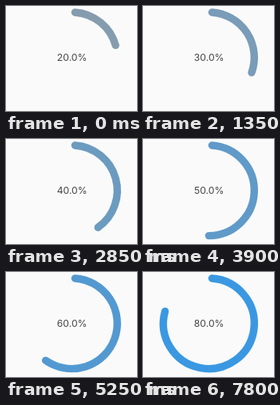
Write an HTML page that moves like this. It is 164 px wide and 132 px high and loops after 8000 ms.

```html
<!DOCTYPE html>
<html>
<head>
<meta charset="utf-8">
<style>
html, body { margin: 0; width: 100%; height: 100%; overflow: hidden; background: #fafafa; }
svg { display: block; width: 100%; height: 100%; }
text { font: 12.2px Inter, sans-serif; fill: #444; text-anchor: middle; }
</style>
</head>
<body>
<svg viewBox="0 0 164 132">
  <path id="arc" fill="none" stroke-width="9.4" stroke-linecap="round"/>
  <text id="label" x="82.7" y="69"></text>
</svg>
<script>
const LOOP = 8000, CX = 82.4, CY = 64.7, R = 56.9;
const INSET = 4; // degrees kept free for the round caps
const steps = [1350, 2850, 3900, 5250, 6450, 7800];
const grey = [158, 158, 158], blue = [33, 150, 243];
const arc = document.getElementById('arc');
const label = document.getElementById('label');

function point(part) {
  const a = (INSET + (360 - 2 * INSET) * part) * Math.PI / 180;
  return `${(CX + R * Math.sin(a)).toFixed(3)} ${(CY - R * Math.cos(a)).toFixed(3)}`;
}

function draw(ms) {
  const part = (2 + steps.filter(s => ms >= s).length) / 10;
  const color = grey.map((g, i) => Math.round(g + (blue[i] - g) * part));
  arc.setAttribute('d', `M${point(0)}A${R} ${R} 0 ${part > 0.5 ? 1 : 0} 1 ${point(part)}`);
  arc.setAttribute('stroke', `rgb(${color})`);
  label.textContent = (part * 100).toFixed(1) + '%';
}

const start = performance.now();
function tick() {
  draw((performance.now() - start) % LOOP);
  requestAnimationFrame(tick);
}
tick();
</script>
</body>
</html>
```
